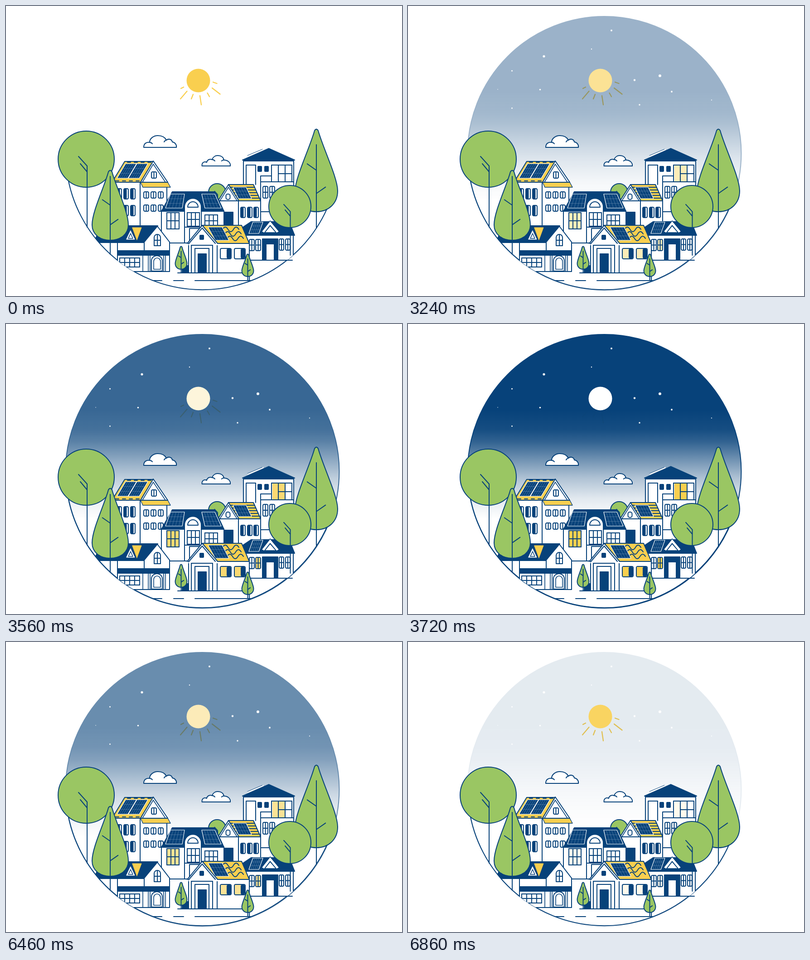
An HTML page for the animation above (6940 ms loop, 874 by 640 pixels).

```html
<!DOCTYPE html>
<html lang="en">
<head>
<meta charset="utf-8">
<title>Solar town, day and night</title>
<style>
html, body { margin: 0; width: 100%; height: 100%; overflow: hidden; background: #fff; }
svg { display: block; width: 874px; height: 640px; }
</style>
</head>
<body>
<svg id="stage" viewBox="0 0 874 640" stroke-linejoin="round" stroke-linecap="round"></svg>
<script>
const NAVY = '#07427a', GREEN = '#9ac663', YELLOW = '#f9cf4f', WHITE = '#fff';
const LOOP = 6940, DUSK = 3000, DAWN = 6220, STEP = 80;

const path = (d, fill = 'none', stroke = NAVY, width = 2) =>
  `<path d="${d}" fill="${fill}" stroke="${stroke}" stroke-width="${width}"/>`;
const poly = (points, fill = WHITE, stroke, width) => path(`M${points}Z`, fill, stroke, width);
const rect = (x, y, w, h, fill = WHITE, r = 0, stroke = NAVY, width = 2) =>
  `<rect x="${x}" y="${y}" width="${w}" height="${h}" rx="${r}" fill="${fill}" stroke="${stroke}" stroke-width="${width}"/>`;
const disc = (x, y, r, fill, stroke = 'none') =>
  `<circle cx="${x}" cy="${y}" r="${r}" fill="${fill}" stroke="${stroke}" stroke-width="2"/>`;
const lamp = (x, y, w, h) =>
  `<rect class="night" x="${x}" y="${y}" width="${w}" height="${h}" fill="${YELLOW}"/>`;
const inCircle = body => `<g clip-path="url(#globe)">${body}</g>`;

// Lines dividing a box into equal columns and rows.
function bars(x, y, w, h, cols, rows) {
  let d = '';
  for (let i = 1; i < cols; i++) d += `M${x + w * i / cols} ${y}v${h}`;
  for (let i = 1; i < rows; i++) d += `M${x} ${y + h * i / rows}h${w}`;
  return path(d);
}

const gridWindow = (x, y, w, h, cols, rows, lit = 0) =>
  rect(x, y, w, h) + (lit ? lamp(x + 1, y + 1, lit, h - 2) : '') +
  bars(x, y, w, h, cols, rows) + rect(x, y, w, h, 'none');

const paneWindow = (x, y, w, h, lit) =>
  rect(x, y, w, h, WHITE, 3) + (lit ? lamp(x + 1, y + 1, w - 2, h - 2) : '') + bars(x, y, w, h, 2, 2);

const shutter = (x, y, w, h) =>
  rect(x, y, w, h, WHITE, 3) + rect(x + 1, y + 1, w * .55, h - 2, NAVY, 1, 'none');

// Solar panel: a sheared quad, top edge x1..x2 and bottom edge x3..x4.
function panel(x1, x2, top, x3, x4, bottom, cols = 5, rows = 3) {
  let d = '';
  for (let i = 1; i < cols; i++) {
    const k = i / cols;
    d += `M${x1 + (x2 - x1) * k} ${top}L${x3 + (x4 - x3) * k} ${bottom}`;
  }
  for (let i = 1; i < rows; i++) {
    const k = i / rows, y = top + (bottom - top) * k;
    d += `M${x1 + (x3 - x1) * k} ${y}L${x2 + (x4 - x2) * k} ${y}`;
  }
  return poly(`${x1} ${top} ${x2} ${top} ${x4} ${bottom} ${x3} ${bottom}`, NAVY, WHITE, 1.2) +
    path(d, 'none', '#6d8fb2', .6);
}

function roundTree(x, y, r, trunkX, root, s) {
  const fork = y + 15 * s;
  return disc(x, y, r, GREEN, NAVY) +
    path(`M${trunkX} ${root}V${fork}l${-19 * s} ${-21 * s}M${trunkX} ${fork + 13 * s}l${-15 * s} ${-18 * s}`);
}

// Teardrop tree; widest at `belly`.
function dropTree(x, top, half, belly, bottom, trunkTop, root, tip = 4) {
  const h = bottom - top, low = belly + (bottom - belly) * .62, b = half * .55;
  const y1 = top + h * .23, y2 = top + h * .59;
  const twig = half * .43, rise = half * .3;
  return path(`M${x - tip} ${top + tip}Q${x} ${top - tip * .6} ${x + tip} ${top + tip}
    C${x + half * .31} ${y1} ${x + half} ${y2} ${x + half} ${belly}
    C${x + half} ${low} ${x + b} ${bottom} ${x} ${bottom}
    S${x - half} ${low} ${x - half} ${belly}
    C${x - half} ${y2} ${x - half * .31} ${y1} ${x - tip} ${top + tip}Z`, GREEN) +
    path(`M${x} ${trunkTop}V${root}M${x} ${top + h * .5}l${-twig} ${-rise}M${x} ${top + h * .78}l${twig} ${-rise}`);
}

const sun = disc(424.5, 164.5, 26, YELLOW) +
  path('M392 179l-6 3M399.500 188L385 205M413 195l-4 10M428 198l3 20M444.500 192l4.500 8M455 181l17.500 13.500M457 168l8.500 3', 'none', YELLOW, 2.3);

const stars = [[449, 54, 2], [300, 111, 2.6], [405, 95, 1.2], [229.5, 143, 1.6], [198, 184, .8],
  [291.5, 184.5, 1.8], [229.5, 225.5, 1.4], [500, 163.5, 2.2], [556, 154, 3], [582, 189, 1.9],
  [511, 218, 1.7], [670, 207.5, 1.1]].map(([x, y, r]) => disc(x, y, r, '#f4f7fa')).join('');

const night = `<g class="night">${disc(433.5, 325, 302, 'url(#sky)', NAVY)}${stars}${disc(424.5, 164.5, 26, WHITE)}</g>`;

const clouds =
  path('M304 312C304 304 309 300 317 301C317 292 326 286 335 286C345 286 351 290 354 296C359 292 366 294 367 300C373 301 377 306 376 312Z', WHITE) +
  path('M317 301q4 0 6 3M354 296q-4 1-5 4') +
  path('M432.500 353C432 346 437 342 443 345C444 339 450 337 455 339C457 333 462 330 467 330C475 330 480 334 481 340C490 340 496 346 495 353Z', WHITE) +
  path('M455 339q4 0 6 3M481 340q-4 0-5 2');

const rows = (ys, xs, draw) => ys.map(y => xs.map(x => draw(x, y)).join('')).join('');

const tallHouse =
  rect(234, 389, 121, 110) + path('M296 389V486') +
  rows([403, 440], [245, 260, 275], (x, y) => shutter(x, y, 10, 23)) +
  rows([410, 439], [304, 320, 336], (x, y) => rect(x, y, 11, 14, WHITE, 3) + bars(x, y, 11, 14, 2, 1)) +
  poly('297 389 357 389 363 400 302 400', YELLOW, NAVY, 1.4) +
  poly('262 343 325 343 297 389 234 389', YELLOW) +
  path('M268 345H320M242 386H294').replace('/>', ' stroke-dasharray="7 8"/>') +
  panel(264, 288, 348, 245, 269, 380) + panel(289, 313, 348, 270, 294, 380) +
  poly('325 342 357 389 297 389') + path('M301 389L325 349 352 389', 'none', NAVY, 1.6) +
  rect(321, 366, 11, 14, WHITE, 3) + bars(321, 366, 11, 14, 2, 1);

const villa =
  rect(524, 342, 111, 112) +
  path('M530 394V351H551V394M562 454V375H586V351') +
  rect(556, 354, 8, 11, NAVY, 1) + rect(571, 354, 8, 11, NAVY, 1) +
  rect(586, 351, 45, 37) + lamp(588, 352, 29, 35) + bars(586, 351, 45, 37, 3, 1) +
  path('M562 388H635M601 370H631') +
  paneWindow(567, 398, 11, 26) + paneWindow(582, 398, 11, 26) +
  poly('522 340 580 314.500 637 340', NAVY) + path('M534 331L567 317', 'none', WHITE, 3) +
  path('M533 330L566 316', 'none', NAVY, 1);

const stripes = [400, 406, 412, 418, 424].map(y => {
  const k = (y - 394) / 36;
  return `M${491 + 23 * k} ${y}H${546 + 16 * k}`;
}).join('');

const stripedHouse =
  rect(470, 429, 92, 60) + rect(478, 455, 23, 34, NAVY) + path('M513 430V489') +
  poly('491 394 546 394 562 430 514 430', YELLOW) + path(stripes) +
  panel(501, 530, 400, 513, 542, 425) +
  poly('491 394 514 430 468 430', WHITE) + path('M470 431V455M472 430L491 400 510 430', 'none', NAVY, 1.6) +
  rect(485.5, 415, 9, 12, WHITE, 4) +
  rows([444], [518, 533, 547], (x, y) => shutter(x, y, 10, 23));

const manor =
  rect(343, 452, 138, 71) +
  poly('367 410 461 410 481 453 343 453', NAVY) +
  panel(363, 394, 415, 352, 389, 446) + panel(432, 461, 415, 439, 475, 446) +
  path('M394 523V443A18.500 18.500 0 0 1 431 443V523', WHITE) +
  path('M401 444A11.500 12 0 0 1 424 444Z', WHITE) +
  gridWindow(355, 456, 27, 36, 3, 2, 25) + gridWindow(400, 456, 27, 30, 3, 2) +
  gridWindow(439, 461, 28, 26, 3, 2) + rect(405, 491, 21, 32) + path('M394 488H431');

const bungalow = inCircle(
  rect(530, 505, 104, 56) +
  poly('520 490 541 476 625 476 637 506 520 506', NAVY) +
  panel(545, 567, 477, 536, 558, 502) +
  poly('583 474 603 498 597 501 583 484 570 501 564 498', WHITE, NAVY, 1.4) +
  poly('583 485 596 500 571 500', WHITE, NAVY, 1.4) +
  paneWindow(537, 515, 11, 25) + paneWindow(551, 515, 11, 25, true) +
  rect(566, 514, 34, 47, NAVY) + rect(574, 525, 18, 36, WHITE) +
  paneWindow(603, 514, 10, 25) + paneWindow(617, 514, 10, 25));

const cottage = inCircle(
  rect(246, 521, 115, 65) +
  poly('210 485 335 485 306 522 194 522', NAVY) +
  poly('279 489 299 489 289 516', YELLOW, YELLOW, 1) +
  poly('275 496 284 515 266 515', WHITE, WHITE, 1) + poly('275 502 280 513 270 513', WHITE, NAVY, 1.5) +
  poly('334 486 361 521 361 540 305 540 305 521') +
  path('M327 529V511A7 7 0 0 1 341 511V529ZM334 504V529M327 517H341', WHITE) +
  rect(246, 540, 115, 10, NAVY) +
  gridWindow(251, 556, 44, 20, 4, 2) +
  path('M302 551V586M314 551V586M318 551V586M348 551V586M352 551V586', 'none', NAVY, 1.6) +
  path('M321 585V562A12 11 0 0 1 345 562V585Z', WHITE) +
  path('M326 581V564A7.500 8 0 0 1 341 564V581Z', WHITE, NAVY, 1.6));

const waves = [493, 503, 513].map((y, i) => `M${478 + i * 5} ${y}q6-10 12 0t12 0t12 0`).join('');
const bigWindow = x => rect(x, 535, 24, 23, WHITE, 3) + lamp(x + 1, 536, 13, 21) +
  rect(x + 14, 536, 9, 21, NAVY, 2, 'none');

const solarHouse =
  rect(389, 573, 13, 15, NAVY) +
  rect(403, 523, 134, 66, WHITE, 0, 'none') + path('M403 524V589M466 524V589M537 524V606') +
  poly('433 484 520 484 537 524 466 524', YELLOW) + path(waves) +
  panel(446, 477, 488, 462, 492, 517) +
  poly('433 484 467 524 467 528 403 528 400 524', WHITE, 'none') +
  path('M400 524L433 484 467 524M403 525L433 490 462 524') +
  rect(428, 506, 8, 9, NAVY, 1) +
  rect(409, 528, 47, 61) + rect(417, 535, 31, 54) + rect(424, 547, 18, 42, NAVY) +
  bigWindow(473) + bigWindow(504);

const ground = path('M361 523H402M379 589H523M545 561H632M417 606H540M370 606H392M324 606H344');
const rim = path('M135 370A301.500 301.500 0 0 0 725 400');

document.getElementById('stage').innerHTML = `
  <defs>
    <clipPath id="globe"><circle cx="433" cy="324.5" r="302"/></clipPath>
    <linearGradient id="sky" gradientUnits="userSpaceOnUse" x1="0" y1="190" x2="0" y2="430">
      ${[[0, 1], [.18, .94], [.29, .83], [.44, .6], [.62, .33], [.81, .12], [1, 0]]
        .map(([at, a]) => `<stop offset="${at}" stop-color="${NAVY}" stop-opacity="${a}"/>`).join('')}
    </linearGradient>
  </defs>` +
  sun + night + clouds + rim +
  roundTree(466, 411, 19, 467, 440, .35) +
  tallHouse + villa + stripedHouse + manor +
  dropTree(685, 271, 47, 408, 454, 306, 490) +
  bungalow + roundTree(626.5, 442.5, 46.5, 627.5, 550, .76) +
  cottage + solarHouse + ground +
  roundTree(177, 338, 62, 179, 488, 1) +
  dropTree(230, 362, 40, 483, 517, 376, 548) +
  dropTree(386.5, 530, 13, 568, 581, 541, 588, 2) +
  dropTree(533.5, 547, 13, 584, 597, 558, 606, 2);

const nightParts = document.querySelectorAll('.night');

// Night opacity moves in tenths, one step every 80 ms.
function nightLevel(t) {
  const tenths = from => Math.floor((t - from) / STEP) + 1;
  if (t < DUSK) return 0;
  if (t < DAWN) return Math.min(10, tenths(DUSK)) / 10;
  return (10 - tenths(DAWN)) / 10;
}

function draw(now) {
  const level = nightLevel(now % LOOP);
  nightParts.forEach(part => part.setAttribute('opacity', level));
  requestAnimationFrame(draw);
}
draw(performance.now());
</script>
</body>
</html>
```
